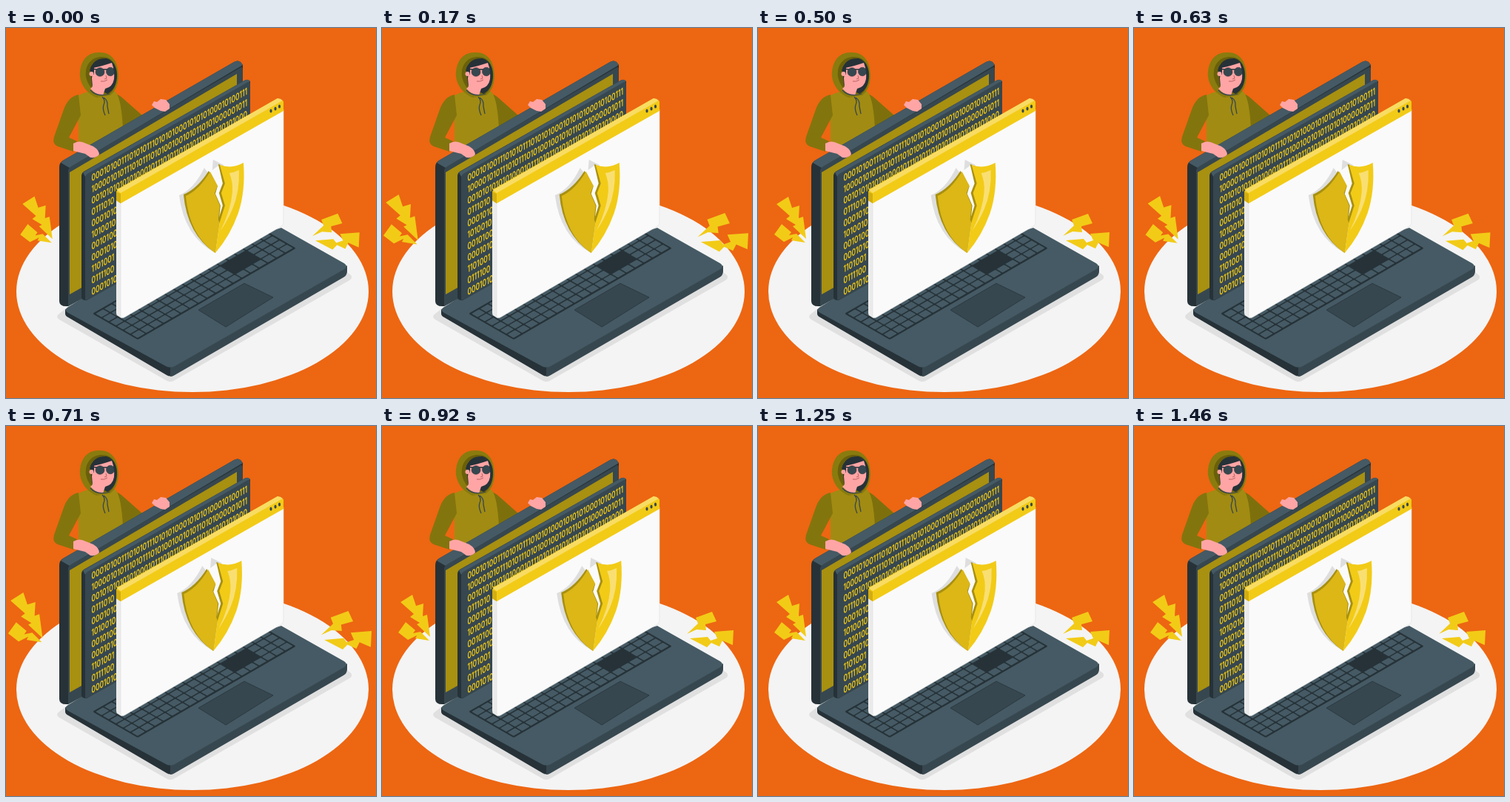
An HTML page for the animation above (1500 ms loop, 500x500 px).

```html
<!DOCTYPE html>
<html lang="en">
<head>
<meta charset="utf-8">
<style>
  html, body { margin: 0; height: 100%; overflow: hidden; background: #ed6612; }
  svg { display: block; width: 100vw; height: 100vh; }
  #code { font: 600 13px Inter, sans-serif; fill: #f2cb17; }
</style>
</head>
<body>
<svg viewBox="0 0 500 500">
  <rect width="500" height="500" fill="#ed6612"/>
  <ellipse cx="252" cy="356" rx="238" ry="136" fill="#f4f4f4"/>

  <!-- laptop base -->
  <path d="M72 386 90 372 372 272 465 333Q470 337 464 341L228 476Q222 480 216 476L72 394Q66 390 72 386Z" fill="#e0e0e0"/>
  <path d="M80 380V386Q80 389 84 391L217 469Q222 472 227 469L222 450Z" fill="#263238"/>
  <path d="M222 456V471Q225 471 228 469L456 337Q461 334 461 329V321Z" fill="#37474f"/>
  <path d="M84 377 108 362 150 336 372 270 457 318Q463 322 457 326L228 457Q222 460 216 457L84 385Q77 381 84 377Z" fill="#455a64"/>
  <path d="M260 381 322 345 361 364 297 404Z" fill="#37474f" stroke="#263238" stroke-width=".7"/>
  <g id="keys" transform="matrix(1 -.578 1 .578 119 386)" fill="#455a64">
    <rect x="-1" y="-1" width="214" height="61" rx="2" fill="#263238"/>
  </g>

  <g id="bolts" fill="#f2cb17">
    <path d="M25 238 41 228 46 243 56 240 55 257 61 255 65 285 47 268 51 266 38 258 43 254Z"/>
    <path d="M22 279 32 265 45 276 42 280 52 278 64 290 45 287 47 283 35 289Z"/>
    <path d="M424 259 446 251 452 264 437 268 438 276 425 275 412 281 427 267Z"/>
    <path d="M416 287 440 285 444 290 453 287 449 278 475 276 474 296 460 290 456 298 445 293 439 299Z"/>
  </g>

  <!-- hooded figure -->
  <path d="M145 88Q153 90 158 95L184 118 160 135 140 130Z" fill="#7d700c"/>
  <path d="M98 91Q112 84 126 84L148 86Q156 96 158 136L98 170Z" fill="#a18b12"/>
  <path d="M98 90Q83 93 77 113L65 147Q62 157 70 160L91 167 96 153 85 148 101 118Z" fill="#83750d"/>
  <path d="M100 66C99 43 111 32 127 33 143 33 152 45 152 66Q151 84 141 91L122 94Q103 85 100 66Z" fill="#8a7b0e"/>
  <path d="M108 66C106 49 116 39 130 39 144 39 150 50 150 66Q149 82 140 89L124 88Q111 81 108 66Z" fill="#6b600a"/>
  <path d="M114 54Q120 40 136 41 149 45 150 63 150 82 137 89L116 77Z" fill="#263238"/>
  <path d="M118 54Q128 52 143 47 147 58 146 69 144 80 134 82L131 91Q122 91 114 82L117 79 116 68Z" fill="#ffa5a5"/>
  <path d="M113 56 119 53V63H115Z" fill="#263238"/>
  <circle cx="115.500" cy="62" r="3" fill="#ffa5a5"/>
  <path d="M115 55 122 56M120 56H147" fill="none" stroke="#263238" stroke-width="1.500"/>
  <g fill="#37474f" stroke="#263238" stroke-width=".6">
    <ellipse cx="127" cy="59.500" rx="6" ry="5.800"/>
    <ellipse cx="141" cy="59" rx="5.500" ry="5.800"/>
  </g>
  <path d="M128 72Q133 73 137 70M135 64 136 68 133 69" fill="none" stroke="#b96365"/>
  <path d="M114 84Q123 94 140 89M130 93Q135 98 132 104 130 109 134 118M132 94Q138 98 137 106L139 116" fill="none" stroke="#37474f" stroke-width="1.300"/>

  <!-- laptop lid -->
  <path d="M72 188Q72 182 77 179L308 46Q313 43 317 46L320 50V190L102 366 84 376Q72 377 72 369Z" fill="#263238"/>
  <path d="M74 182 77 179 308 46Q313 43 317 46L320 50 86 189Z" fill="#455a64"/>
  <path d="M84 193Q84 190 88 187L316 54Q320 51 320 57V190L102 366 84 376Z" fill="#37474f"/>
  <path d="M86 195 312 62V180L102 351 86 360Z" fill="#a89010"/>
  <path d="M91 156Q99 151 108 156L118 160Q126 165 126 171 122 176 114 175L107 170 91 166Z" fill="#ffa5a5"/>
  <path d="M197 104 200 99 204 100 209 96 216 97 221 103 221 109 215 113 209 112 201 108Z" fill="#ffa5a5"/>

  <!-- code panel -->
  <path d="M102 199Q102 196 105 194L324 70 330 72V244L109 368Q102 368 102 364Z" fill="#263238"/>
  <path d="M104 195 324 70Q328 69 330 72L107 201Z" fill="#455a64"/>
  <path d="M107 202Q107 199 110 197L327 73Q330 72 330 76V244L109 368 107 367Z" fill="#37474f"/>
  <g id="code"></g>

  <!-- window -->
  <path d="M149 222 156 225V392L151 389Q149 388 149 385Z" fill="#ebebeb"/>
  <path d="M155 236 375 110V262Q375 266 372 268L160 391Q155 393 155 389Z" fill="#fafafa" stroke="#e0e0e0" stroke-width=".6"/>
  <path d="M149 221 152 217 367 95 375 99V112L155 237 149 233Z" fill="#f2cb17"/>
  <path d="M150 219 367 95Q371 95 374 98L155 223Z" fill="#f8dc63"/>
  <path d="M149 221 155 224V237L149 233Z" fill="#d3ad10"/>
  <g fill="#37474f">
    <ellipse cx="358" cy="112" rx="1.600" ry="2.500"/>
    <ellipse cx="364" cy="109" rx="1.600" ry="2.500"/>
    <ellipse cx="369.500" cy="106" rx="1.600" ry="2.500"/>
  </g>

  <g id="shield">
    <path d="M234 226Q254 218 268 189L278 202 280 178 294 185 290 260 283 304Q241 282 234 226Z" fill="#dedede"/>
    <path d="M276 194 287 186 297 212 291 224 297 240 289 262 282 240Z" fill="#fafafa"/>
    <path d="M240 225Q259 217 274 193L286 214 283 224 290 240 283 304Q245 279 240 225Z" fill="#a89010"/>
    <path d="M243 227Q261 219 276 194L286 213 282 223 289 240 287 258 289 262 283 304Q248 280 243 227Z" fill="#dcb716"/>
    <path d="M287 184 290 185 297 211 292 223 297 240 289 264 287 259 293 240 288 223 293 210Z" fill="#a89010"/>
    <path d="M289 185Q306 191 321 182 324 220 314 250 303 281 283 304L289 262 296 240 291 223 296 210Z" fill="#f2cb17"/>
    <path d="M302 196Q309 195 315 192 316 222 306 245 299 261 290 274 304 246 306 222 307 208 302 196Z" fill="#f9df72"/>
  </g>
</svg>
<script>
const $ = id => document.getElementById(id);
const add = (parent, tag, attrs, text = '') => {
  const el = document.createElementNS('http://www.w3.org/2000/svg', tag);
  for (const name in attrs) el.setAttribute(name, attrs[name]);
  el.textContent = text;
  parent.append(el);
};

// keyboard, with a gap of missing keys
for (let row = 0; row < 6; row++) {
  for (let col = 0; col < 18; col++) {
    const x = 1 + col * 11.75, y = 1 + row * 9.7;
    const missing = x > 134 && x < 168 && y > 27 && y < 48;
    if (!missing) add($('keys'), 'rect', { x, y, width: 10.2, height: 8.2, rx: 1 });
  }
}

const rows = [
  '0001010011101010111010101000101010100010100111',
  '1000010101110101110101001001010110101000001011',
  '0010101010101000101110101101010110101010101000',
  '0111010', '0001010', '1010010', '0010100', '0001010', '1101001', '0111100', '0001010'
];
rows.forEach((text, i) => add($('code'), 'text',
  { transform: `matrix(.645 -.361 0 1 115.500 ${207.5 + i * 15.4})` }, text));

const LOOP = 1500, STEP = LOOP / 36, LAG = 18;
const pulse = [[0, 1], [.1, 1.1], [.3, 1], [.4, 1], [.5, 1.1], [.6, 1], [1, 1]];
const shake = [0, -1, 2, -4, 4, -4, 4, -4, 2, -1, 0].map((x, i) => [i / 10, x]);

function valueAt(keys, p) {
  const i = keys.findIndex(key => key[0] > p);
  const [p0, v0] = keys[i - 1], [p1, v1] = keys[i];
  return v0 + (v1 - v0) * (p - p0) / (p1 - p0);
}

function draw() {
  const tick = Math.floor((performance.now() + 4) / STEP) % 36;
  const p = (tick * STEP + LAG) / LOOP;
  $('bolts').setAttribute('transform',
    `translate(249 263) scale(${valueAt(pulse, p)}) translate(-249 -263)`);
  $('shield').setAttribute('transform', `translate(${valueAt(shake, p)})`);
  requestAnimationFrame(draw);
}
draw();
</script>
</body>
</html>
```
